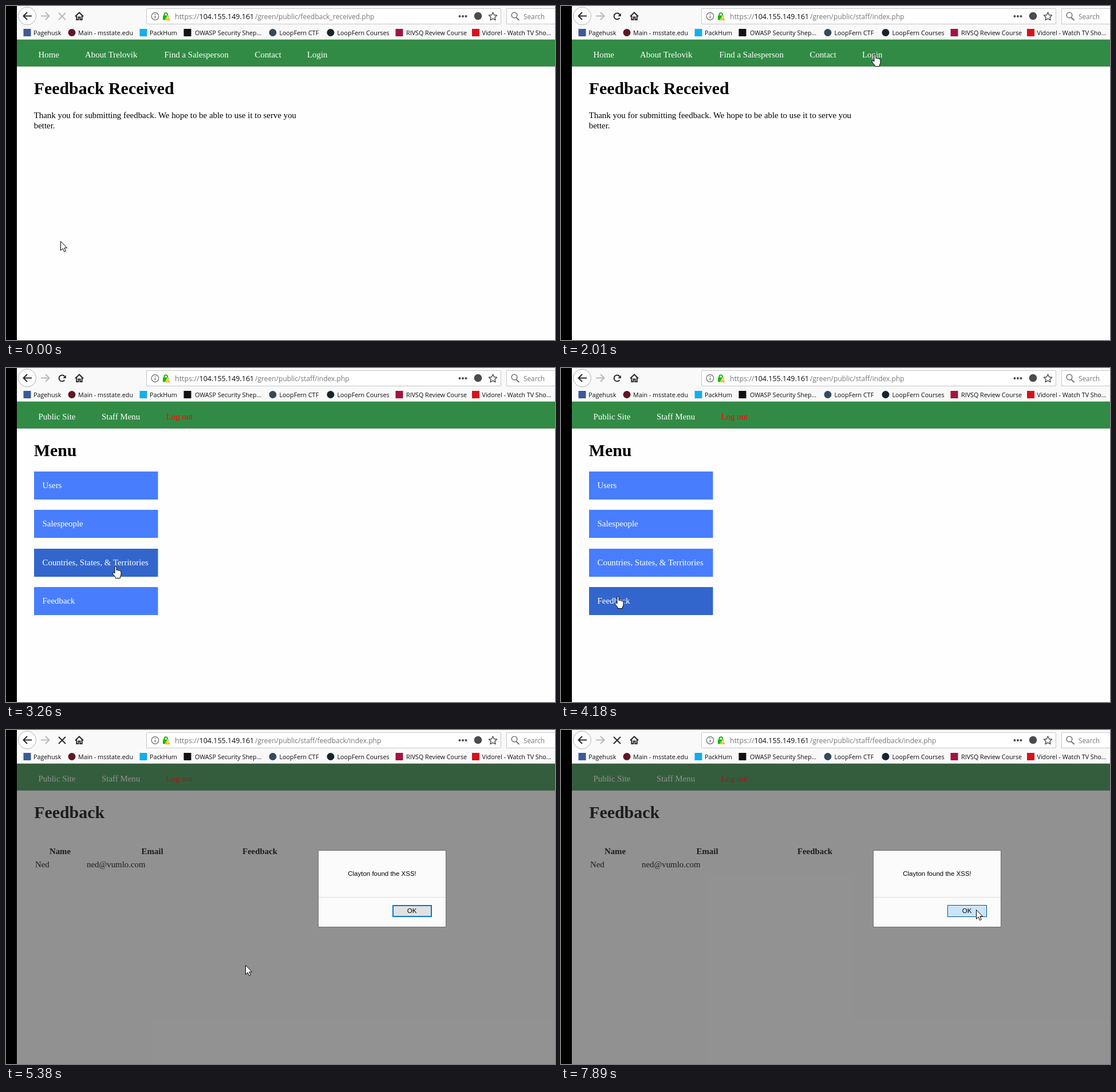
An HTML page that plays this animation: 959x584 px, repeating every 8 s.

```html
<!DOCTYPE html>
<html lang="en">
<head>
<meta charset="utf-8">
<title>Feedback form</title>
<style>
  html, body { margin: 0; width: 100%; height: 100%; overflow: hidden; background: #fff; }
  svg { display: block; width: 959px; height: 584px; }
  text { white-space: pre; }
  .serif { font: 14.9px "Liberation Serif", serif; }
  .serif .head { font-size: 29.9px; font-weight: bold; }
  .bold { font-weight: bold; }
  .mid { text-anchor: middle; }
  .ui { font: 10.75px "Open Sans", sans-serif; fill: #0c0c0d; }
  .url { font-size: 12.5px; fill: #777; }
  .path { font-size: 12.05px; }
  .search { font-size: 11.8px; }
  .box { font: 11.5px "Liberation Sans", sans-serif; }
  .line { fill: none; stroke: #2a2a2e; stroke-width: 2; }
  .nav { fill: #fff; }
  .tile { fill: #487efd; }
  .tile.hot { fill: #3366cc; }
  #ok { fill: #e1e1e1; stroke: #0078d7; stroke-width: 2; }
  #ok.hot { fill: #e5f1fb; stroke-width: 1; }
  #ok.down { fill: #cce4f7; stroke: #005499; stroke-width: 1; }
  .pointer { fill: #fff; stroke: #000; stroke-linejoin: round; }
</style>
</head>
<body>
<svg viewBox="0 0 959 584">
  <rect width="959" height="584" fill="#fefefe"/>

  <g class="serif">
    <rect x="19" y="59" width="940" height="46.5" fill="#328b45"/>
    <rect x="19" y="104.5" width="940" height="1" fill="#26753a"/>

    <g id="thanks">
      <g class="nav">
        <text x="56.5" y="90">Home</text>
        <text x="138" y="90">About Trelovik</text>
        <text x="276.5" y="90">Find a Salesperson</text>
        <text x="434.5" y="90">Contact</text>
        <text x="526" y="90">Login</text>
      </g>
      <text class="head" x="48.7" y="153.5">Feedback Received</text>
      <text x="48.7" y="195.5">Thank you for submitting feedback. We hope to be able to use it to serve you</text>
      <text x="48.7" y="214">better.</text>
    </g>

    <g id="staffNav" class="nav">
      <text x="56.5" y="90">Public Site</text>
      <text x="167" y="90">Staff Menu</text>
      <text x="279.5" y="90" fill="#f00">Log out</text>
    </g>

    <g id="menu">
      <text class="head" x="48.7" y="153.5">Menu</text>
      <g id="tiles"></g>
    </g>

    <g id="list">
      <text class="head" x="49.2" y="153.5">Feedback</text>
      <g class="bold mid">
        <text x="94.5" y="217">Name</text>
        <text x="255.5" y="217">Email</text>
        <text x="443.5" y="217">Feedback</text>
      </g>
      <text x="51" y="239.5">Ned</text>
      <text x="141" y="239.5">ned@vumlo.com</text>
    </g>
  </g>

  <g id="alert" class="box">
    <rect x="19" y="59" width="940" height="525" fill="#363636" fill-opacity=".54"/>
    <rect x="545.5" y="210.5" width="223" height="134" fill="#fbfbfb" stroke="#6c6c6c"/>
    <path d="M546 292.5H768" stroke="#dcdcdc"/>
    <text class="mid" x="657" y="255">Clayton found the XSS!</text>
    <rect id="ok"/>
    <text class="mid" x="709" y="320">OK</text>
  </g>

  <g class="ui">
    <rect width="959" height="58" fill="#f9f9fa"/>
    <rect y="58" width="959" height="1" fill="#c4c8c5"/>
    <circle cx="37" cy="17.5" r="15.5" fill="#fdfdfd" stroke="#b4b4b6"/>
    <path class="line" d="M45 17.5H31M37 11L30.5 17.5L37 24"/>
    <path class="line" style="stroke:#b9b9bb" d="M61 17.5H75M69 11L75.5 17.5L69 24"/>
    <path id="stop" class="line" d="M92 12L104 24M104 12L92 24"/>
    <g id="reload">
      <path class="line" d="M102.3 21.2A5.4 5.4 0 1 1 102.4 14.8"/>
      <path d="M104.8 12.5V18H99.3Z" fill="#2a2a2e"/>
    </g>
    <path class="line" d="M121 18.3L128 11.5L135 18.3M123.3 17V24H126.5V19.5H129.5V24H132.7V17"/>

    <rect x="245.5" y="4.5" width="619" height="27" rx="1.5" fill="#fff" stroke="#c6c6c8"/>
    <circle cx="260.5" cy="18" r="6.3" fill="none" stroke="#6a6a6e" stroke-width="1.2"/>
    <path d="M260.5 17V21.5M260.5 14V15.6" stroke="#6a6a6e" stroke-width="1.5"/>
    <path d="M276.5 17V14.5A2.8 2.8 0 0 1 282 14.5V17" fill="none" stroke="#12bc00" stroke-width="2"/>
    <rect x="274" y="16.5" width="10.5" height="8" rx="1" fill="#12bc00"/>
    <path d="M282.5 16.5L287.5 25.5H277.5Z" fill="#ffb400" stroke="#fff" stroke-width=".8"/>
    <path d="M282.5 19.5V22.3M282.5 23.3V24.5" stroke="#fff"/>
    <g fill="#4a4a4f">
      <circle cx="792.5" cy="18" r="2"/><circle cx="798" cy="18" r="2"/><circle cx="803.5" cy="18" r="2"/>
      <circle cx="824.5" cy="17.5" r="6.8"/>
    </g>
    <path d="M850.5 11L852.6 15.7L857.6 16.2L853.9 19.7L855 24.7L850.5 22.2L846 24.7L847.1 19.7L843.4 16.2L848.4 15.7Z"
      fill="none" stroke="#4a4a4f" stroke-width="1.4" stroke-linejoin="round"/>
    <path d="M965 4.5H874.5V31.5H965" fill="#fff" stroke="#c6c6c8"/>
    <path d="M891 20L896.5 25" stroke="#737377" stroke-width="2"/>
    <circle cx="888" cy="16" r="4.8" fill="none" stroke="#737377" stroke-width="1.6"/>
    <g class="url">
      <text x="295" y="23">https://</text>
      <text x="337.5" y="23" fill="#0c0c0d">104.155.149.161</text>
      <text id="path" class="path" x="435" y="23"></text>
      <text class="search" x="904" y="23">Search</text>
    </g>
    <g id="bookmarks"></g>
  </g>

  <rect width="19" height="584" fill="#000"/>
  <path id="arrow" class="pointer" d="M0 0V16L3.7 12.5L6.2 18.2L8.8 17L6.3 11.5H11.2Z"/>
  <path id="hand" class="pointer" d="M-1.5 12.5V1.5Q-1.5 0 0 0T1.5 1.5V7Q3 5.6 4.5 7.6Q6 6.4 7.2 8.2Q9.5 7.4 9.5 9.5V14Q9.5 16.5 8 18.5V21H-.5V19L-5 13.5Q-6 11 -3.6 11Z"/>
</svg>
<script>
const LOOP = 8000;
const $ = id => document.getElementById(id);

function setAll(el, attrs) {
  for (const key in attrs) el.setAttribute(key, attrs[key]);
}

function add(parent, tag, attrs, label = '') {
  const el = document.createElementNS('http://www.w3.org/2000/svg', tag);
  setAll(el, attrs);
  el.textContent = label;
  return parent.appendChild(el);
}

const bookmarks = [
  ['rect', 37, '#3b5998', 48, 'Pagehusk'],
  ['circle', 115, '#5d1725', 126, 'Main - msstate.edu'],
  ['rect', 240, '#12aeef', 251, 'PackHum'],
  ['rect', 317, '#111', 330, 'OWASP Security Shep...'],
  ['circle', 466, '#34495a', 477.5, 'LoopFern CTF'],
  ['circle', 567, '#16252b', 578.5, 'LoopFern Courses'],
  ['rect', 687, '#a3143c', 699, 'RIVSQ Review Course'],
  ['rect', 820.5, '#d8101c', 831.5, 'Vidorel - Watch TV Sho...']
];
for (const [shape, cx, fill, x, label] of bookmarks) {
  add($('bookmarks'), shape, shape === 'rect'
    ? { x: cx - 6.5, y: 40, width: 13, height: 13, fill }
    : { cx, cy: 46.5, r: 6.5, fill });
  add($('bookmarks'), 'text', { x, y: 50.5 }, label);
}

const tiles = ['Users', 'Salespeople', 'Countries, States, & Territories', 'Feedback'].map((label, i) => {
  const y = Math.round(181 + i * 67.4);
  const el = add($('tiles'), 'rect', { class: 'tile', x: 49, y, width: 216.5, height: 49 });
  add($('tiles'), 'text', { x: 63.5, y: y + 29.3, fill: '#fff' }, label);
  return { el, y };
});

// Each leg: first step, last step, number of steps, end point
const legs = [
  [120, 1070, 8, 520, 107],
  [1210, 1580, 3, 549, 85],
  [2400, 2840, 4, 260, 294],
  [2980, 2980, 1, 238, 320],
  [3100, 3760, 6, 100, 400],
  [4620, 5140, 4, 319, 414],
  [5260, 5380, 2, 419, 412],
  [5840, 6370, 5, 645, 341],
  [6500, 6500, 1, 668, 351],
  [6810, 6810, 1, 676, 346],
  [6930, 7230, 3, 726, 315]
];

function pointerAt(t) {
  let x = 96, y = 412;
  for (const [start, end, steps, toX, toY] of legs) {
    if (t < start) break;
    const gap = steps > 1 ? (end - start) / (steps - 1) : 1;
    const part = Math.min(steps, Math.floor((t - start) / gap + 1e-6) + 1) / steps;
    x += (toX - x) * part;
    y += (toY - y) * part;
  }
  return [Math.round(x), Math.round(y)];
}

const inside = (x, y, left, top, right, bottom) => x >= left && x <= right && y >= top && y <= bottom;
const show = (id, on) => { $(id).style.display = on ? '' : 'none'; };

function draw(t) {
  const page = t < 2130 ? 'thanks' : t < 4320 ? 'menu' : 'list';
  const [x, y] = pointerAt(t);

  for (const id of ['thanks', 'menu', 'list']) show(id, id === page);
  show('staffNav', page !== 'thanks');
  show('alert', page === 'list');
  $('path').textContent = '/green/public/' +
    (t < 2010 ? 'feedback_received.php' : page === 'list' ? 'staff/feedback/index.php' : 'staff/index.php');

  const idle = t >= 390 && t < 4480;
  show('reload', idle);
  show('stop', !idle);
  $('stop').style.stroke = t < 390 ? '#b9b9bb' : '';

  let hand = page === 'thanks' && inside(x, y, 526, 76, 562, 95);
  for (const tile of tiles) {
    const over = page === 'menu' && inside(x, y, 49, tile.y, 265, tile.y + 49);
    tile.el.classList.toggle('hot', over && t >= 2980);
    hand = hand || over;
  }

  const state = t >= 7890 ? 'down' : page === 'list' && inside(x, y, 675, 306, 743, 327) ? 'hot' : '';
  const inset = state ? 0.5 : 1;
  setAll($('ok'), {
    class: state,
    x: 675 + inset, y: 306 + inset,
    width: 69 - 2 * inset, height: 21 - 2 * inset
  });

  show('hand', hand);
  show('arrow', !hand);
  setAll($(hand ? 'hand' : 'arrow'), { transform: `translate(${x - 0.5} ${y - 0.5})` });
}

const began = performance.now();
function tick() {
  draw((performance.now() - began) % LOOP);
  requestAnimationFrame(tick);
}
tick();
</script>
</body>
</html>
```
